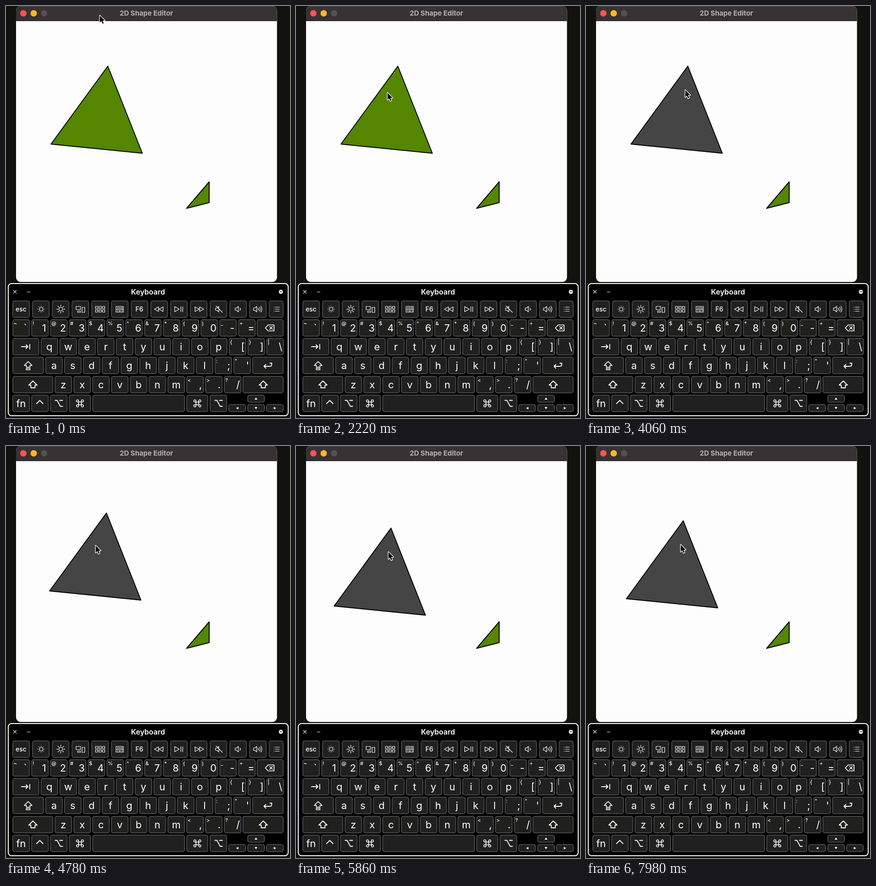
These frames come from a looping animation (622 px wide and 901 px high, 8 s). An HTML page with a canvas:

```html
<!DOCTYPE html>
<html lang="en">
<head>
<meta charset="utf-8">
<title>2D Shape Editor</title>
<style>
html, body { margin: 0; width: 100%; height: 100%; overflow: hidden; background: #12130e; }
canvas { display: block; }
</style>
</head>
<body>
<canvas id="stage" width="622" height="901"></canvas>
<script>
const W = 622, H = 901, LOOP = 8000;
const FONT = 'Inter, Roboto, sans-serif';
const ctx = document.getElementById('stage').getContext('2d');
const backdrop = document.createElement('canvas');
backdrop.width = W;
backdrop.height = H;
const g = backdrop.getContext('2d');

function box(x, y, w, h, r, fill, stroke, line = 2) {
  g.beginPath();
  g.roundRect(x, y, w, h, r);
  if (fill) { g.fillStyle = fill; g.fill(); }
  if (stroke) { g.strokeStyle = stroke; g.lineWidth = line; g.stroke(); }
}

function disc(x, y, r, color) {
  g.beginPath();
  g.arc(x, y, r, 0, Math.PI * 2);
  g.fillStyle = color;
  g.fill();
}

function label(text, x, y, size, weight = 400, color = '#fff', align = 'center') {
  g.font = `${weight} ${size}px ${FONT}`;
  g.textAlign = align;
  g.fillStyle = color;
  g.fillText(text, x, y);
}

// Strokes (or fills) a path given relative to (x, y).
function icon(d, x, y, line = 1.2, filled = false) {
  g.save();
  g.translate(x, y);
  g.lineWidth = line;
  g.lineJoin = g.lineCap = 'round';
  g.strokeStyle = g.fillStyle = '#fff';
  const path = new Path2D(d);
  filled ? g.fill(path) : g.stroke(path);
  g.restore();
}

function key(x0, x1, y, h = 38) {
  box(x0 + 1, y + 1, x1 - x0 - 2, h - 2, 4, '#20201f', '#47474b');
}

function drawWindow() {
  g.save();
  g.beginPath();
  g.roundRect(22, 0, 571.5, 603.5, 10);
  g.clip();
  g.fillStyle = '#fdfdfe';
  g.fillRect(22, 0, 572, 604);
  g.fillStyle = '#383234';
  g.fillRect(22, 0, 572, 32);
  g.fillStyle = '#151213';
  g.fillRect(22, 32, 572, 1);
  g.fillStyle = '#5c5759';
  g.fillRect(22, 0, 572, 1);
  g.restore();
  disc(38, 16, 7, '#ff5450');
  disc(60.7, 16, 7, '#fdb827');
  disc(83.5, 16, 7, '#545052');
  label('2D Shape Editor', 307.5, 21, 15, 700, '#b4b1b2');
}

const PITCH = 41.2, KEY_W = 38.4;
const SHIFT = 'M0-8 L9 1 H4.5 V7 H-4.5 V1 H-9 Z';
const SPEAKER = 'M-8-2.5 H-5 L-1-6 V6 L-5 2.5 H-8 Z';
const COMMAND = 'M-3-3 H3 V3 H-3 Z M-3-3 V-5.2 A2.4 2.4 0 1 0 -5.4-3 Z M3-3 H5.2 A2.4 2.4 0 1 0 3-5.4 Z ' +
  'M3 3 V5.2 A2.4 2.4 0 1 0 5.4 3 Z M-3 3 H-5.2 A2.4 2.4 0 1 0 -3 5.4 Z';
const OPTION = 'M-8-6.5 H-3.5 L3.5 6.5 H8.5 M2-6.5 H8.5';

function letters(text, x, y) {
  [...text].forEach((c, i) => {
    const left = x + i * PITCH;
    key(left, left + KEY_W, y);
    label(c, left + KEY_W / 2, y + 27, 22);
  });
}

// Keys carrying a main symbol and a small shifted one.
function pairs(main, upper, x, y, dx = 31) {
  [...main].forEach((c, i) => {
    const left = x + i * PITCH;
    key(left, left + KEY_W, y);
    label(c, left + dx, y + 27, 22);
    label(upper[i], left + 3, y + 13, 11, 500, '#fff', 'left');
  });
}

function sun(x, y, inner, outer) {
  icon('M4 0 A4 4 0 1 1 -4 0 A4 4 0 1 1 4 0', x, y);
  for (let i = 0; i < 8; i++) {
    const c = Math.cos(i * Math.PI / 4), s = Math.sin(i * Math.PI / 4);
    icon(`M${c * inner} ${s * inner} L${c * outer} ${s * outer}`, x, y, 1.3);
  }
}

function drawFunctionRow() {
  const y = 644, cy = 663;
  for (let i = 0; i < 14; i++) {
    const left = 14 + i * 43.2;
    key(left, i < 13 ? left + 38.4 : 608, y);
  }
  label('esc', 33, 668, 14, 500);
  label('F6', 292, 668, 14, 500);
  sun(77, cy, 6.8, 7);
  sun(120, cy, 6.3, 8.5);
  icon('M-9.5-6 H0 V1 H-9.5 Z M-6 4 H0 V7 H-6 Z M3.5-4 H9.5 V7 H3.5 Z', 163, cy);
  for (let i = 0; i < 6; i++)
    icon('M0 0 H5 V5 H0 Z', 196 + (i % 3) * 7.7, 657 + Math.floor(i / 3) * 7.5);
  icon('M-8-6 H8 V1 H-8 Z M-8 1 V6.5 H8 V1', 249, cy, 1.1);
  icon('M-5-3.5 H-4 M-1.5-3.5 H-.5 M2-3.5 H3 M5-3.5 H6 M-5-1 H-4 M-1.5-1 H-.5 M2-1 H3 M5-1 H6 M-5 4 H-4 M-1.5 4 H2 M5 4 H6', 249, cy, 1.3);
  icon('M-1-5 V5 L-10 0 Z M9-5 V5 L0 0 Z', 335, cy);
  icon('M-9-5.5 V5.5 L1 0 Z M4.5-5.5 V5.5 M8.5-5.5 V5.5', 378.5, cy);
  icon('M-9-5 V5 L0 0 Z M1-5 V5 L10 0 Z', 423, cy);
  icon(SPEAKER + ' M-7-7 L7 7', 467, cy);
  icon(SPEAKER + ' M2.5-2.5 Q4.5 0 2.5 2.5', 510, cy);
  icon(SPEAKER + ' M2-2.5 Q4 0 2 2.5 M5-4.5 Q8.5 0 5 4.5 M8-6.5 Q13 0 8 6.5', 550, cy);
  icon('M-5.5-4.5 H-5 M-2.5-4.5 H6 M-5.5 0 H-5 M-2.5 0 H6 M-5.5 4.5 H-5 M-2.5 4.5 H6', 592.5, cy);
}

function drawKeyboard() {
  box(5, 607, 613, 289, 7, '#000', '#fff');
  label('Keyboard', 311, 631, 16, 600);
  icon('M-3-3 L3 3 M3-3 L-3 3', 19.5, 625);
  icon('M-3 0 H3', 49.5, 625.5);
  disc(602, 625, 4.5, '#fff');
  g.fillStyle = '#000';
  g.fillRect(599.5, 624.3, 5, 1.4);

  drawFunctionRow();

  pairs('`1234567890-=', '~!@#$%^&*()_+', 14, 685, 28.3);
  key(549, 608, 685);
  icon('M-10 0 L-4-6.5 H9 V6.5 H-4 Z M-.5-3 L5.5 3 M5.5-3 L-.5 3', 578, 704, 1.7);

  key(14, 73, 726);
  icon('M-9 0 H5 M1-4 L5 0 L1 4 M9-5 V5', 43, 745, 1.8);
  letters('qwertyuiop', 75.8, 726);
  pairs('[]\\', '{}|', 487.8, 726);

  key(14, 83, 767);
  icon('M0-9 L8.5-.5 H4 V3.5 H-4 V-.5 H-8.5 Z M-4 6 H4 V9 H-4 Z', 48.5, 786.5, 1.7);
  letters('asdfghjkl', 86, 767);
  pairs(';\'', ':"', 456.8, 767);
  key(539, 608, 767);
  icon('M-8 2 H5 Q9 2 9-2 V-5 H5 M-4-2 L-8 2 L-4 6', 573, 786, 1.8);

  key(14, 103.5, 809);
  icon(SHIFT, 59, 828, 1.8);
  letters('zxcvbnm', 106.4, 809);
  pairs(',./', '<>?', 394.8, 809);
  key(518, 608, 809);
  icon(SHIFT, 563.5, 828, 1.8);

  [[14, 52.4], [55.2, 93.6], [96.4, 134.8], [137.6, 186], [189, 392], [395, 443], [446, 484.4]]
    .forEach(([a, b]) => key(a, b, 850));
  label('fn', 33, 877, 22);
  icon('M-7 3.5 L0-3.5 L7 3.5', 74, 866, 1.8);
  icon(OPTION, 115.5, 869, 1.8);
  icon(COMMAND, 162, 869, 1.6);
  icon(COMMAND, 419, 869, 1.6);
  icon(OPTION, 465.5, 869, 1.8);

  key(528.5, 567, 850, 17.5);
  key(487, 525.5, 870.5, 17.5);
  key(528.5, 567, 870.5, 17.5);
  key(569.7, 608, 870.5, 17.5);
  icon('M0-2.5 L3 2.5 H-3 Z', 547.5, 858.5, 1, true);
  icon('M-2.5 0 L2.5-3 V3 Z', 506.5, 879.5, 1, true);
  icon('M0 2.5 L3-2.5 H-3 Z', 547.5, 879.5, 1, true);
  icon('M2.5 0 L-2.5-3 V3 Z', 589, 879.5, 1, true);
}

// Pointer path: [step, x, y]
const PATH = [
  [0, 205, 20], [25, 184, 168], [70, 217, 183], [96, 217, 183],
  [100, 214, 198], [103, 196, 217], [112, 200, 231],
  [125, 202, 231], [145, 203, 224], [171, 207, 215]
];
const GRAB = [217, 183], PRESS = 82, DRAG = 96, LAG = 3;

function slope(i, k) {
  const a = PATH[i - 1], b = PATH[i], c = PATH[i + 1];
  if (!a || !c || (b[k] - a[k]) * (c[k] - b[k]) <= 0) return 0;
  return (c[k] - a[k]) / (c[0] - a[0]);
}

// Cubic Hermite interpolation, flat at turning points.
function pointer(n) {
  let i = 0;
  while (i < PATH.length - 2 && n >= PATH[i + 1][0]) i++;
  const a = PATH[i], b = PATH[i + 1], d = b[0] - a[0];
  const u = Math.min(1, (n - a[0]) / d), v = 1 - u;
  return [1, 2].map(k =>
    a[k] * (1 + 2 * u) * v * v + b[k] * u * u * (3 - 2 * u) +
    d * u * v * (slope(i, k) * v - slope(i + 1, k) * u));
}

// Three uneven holds (20, 100, 20 ms) make up each 140 ms.
function stepAt(t) {
  const p = t % 140;
  return 3 * Math.floor(t / 140) + (p < 20 ? 0 : p < 120 ? 1 : 2);
}

function triangle(points, dx, dy, fill) {
  ctx.beginPath();
  points.forEach(([x, y]) => ctx.lineTo(x + dx, y + dy));
  ctx.closePath();
  ctx.fillStyle = fill;
  ctx.fill();
  ctx.strokeStyle = '#000';
  ctx.lineWidth = 2;
  ctx.lineJoin = 'round';
  ctx.stroke();
}

const LARGE = [[223, 131.5], [98.5, 302], [298.5, 322]];
const SMALL = [[445, 384.5], [395.5, 442.5], [445, 430]];
const GREEN = '#548600', GREY = '#454545';
const ARROW = new Path2D('M0 0 V15.4 L3.5 12.1 L6 18 L8.4 17 L6 11.2 H10.8 Z');

function drawPointer(x, y) {
  ctx.save();
  ctx.translate(x + .5, y + .8);
  ctx.lineJoin = 'round';
  ctx.strokeStyle = '#fff';
  ctx.lineWidth = 2.6;
  ctx.stroke(ARROW);
  ctx.fillStyle = '#000';
  ctx.fill(ARROW);
  ctx.restore();
}

function render(now) {
  const n = stepAt(now % LOOP);
  const [x, y] = pointer(n);
  let dx = 0, dy = 0;
  if (n > DRAG) {
    const [px, py] = pointer(n - LAG);
    dx = Math.round(px - GRAB[0]);
    dy = Math.round(py - GRAB[1]);
  }
  ctx.drawImage(backdrop, 0, 0);
  triangle(LARGE, dx, dy, n < PRESS ? GREEN : GREY);
  triangle(SMALL, 0, 0, GREEN);
  drawPointer(Math.round(x), Math.round(y));
  requestAnimationFrame(render);
}

g.fillStyle = '#12130e';
g.fillRect(0, 0, W, H);
drawWindow();
drawKeyboard();
render(performance.now());
</script>
</body>
</html>
```
